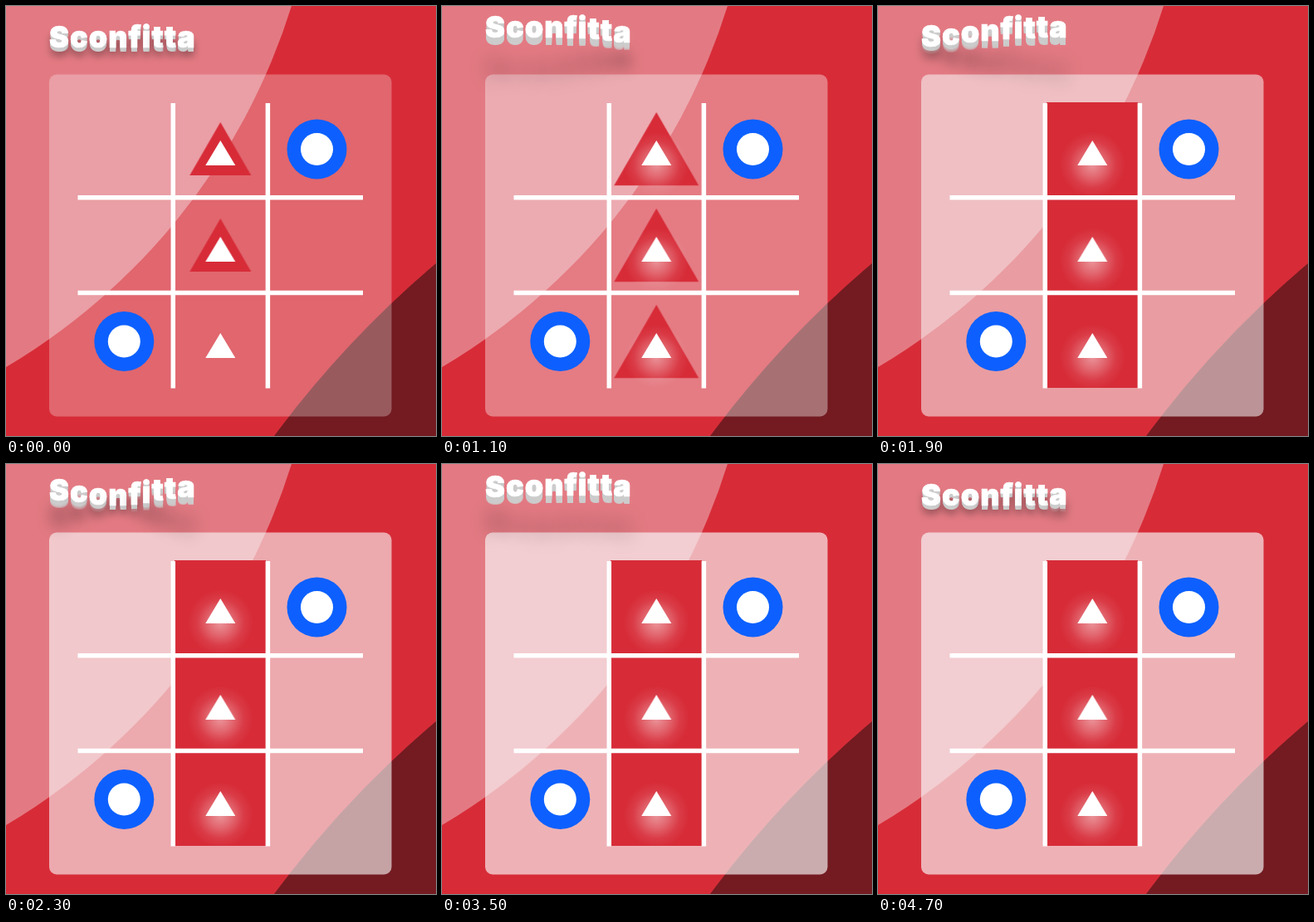
Recreate the animation shown at these times as an HTML page. Size 518 px wide and 518 px high, loop 4.8 s.

```html
<!DOCTYPE html>
<html lang="it">
<head>
<meta charset="utf-8">
<title>Sconfitta</title>
<style>
  html, body { margin: 0; width: 100%; height: 100%; overflow: hidden; background: #d72c38; }
  svg { position: absolute; left: 0; top: 0; width: 518px; height: 518px; }

  h1 {
    position: absolute; left: 52px; top: 19px; margin: 0;
    font: 900 36px/1 Inter, "DejaVu Sans", sans-serif;
    letter-spacing: 1px; white-space: nowrap; color: #fff;
    -webkit-text-stroke: .7px #fff;
  }
  h1 span {
    position: relative; display: inline-block; top: 0;
    animation: bounce 4.8s calc(var(--i) * .1s) infinite both;
  }
  /* Two bounces of 2 s each, then a rest; the way down mirrors the ease of the way up. */
  @keyframes bounce {
    0%, 41.6667%, 83.3333%, 100% {
      top: 0;
      animation-timing-function: ease;
      text-shadow: 0 1px 0 #ccc, 0 2px 0 #ccc, 0 3px 0 #ccc, 0 4px 0 #ccc, 0 5px 0 #ccc,
        0 6px 0 transparent, 0 7px 0 transparent, 0 8px 0 transparent, 0 9px 0 transparent,
        0 10px 10px rgba(0, 0, 0, .4);
    }
    20.8333%, 62.5% {
      top: -12px;
      animation-timing-function: cubic-bezier(.75, 0, .75, .9);
      text-shadow: 0 1px 0 #ccc, 0 2px 0 #ccc, 0 3px 0 #ccc, 0 4px 0 #ccc, 0 5px 0 #ccc,
        0 6px 0 #ccc, 0 7px 0 #ccc, 0 8px 0 #ccc, 0 9px 0 #ccc,
        0 50px 25px rgba(0, 0, 0, .2);
    }
  }

  .panel { fill: #fafafa; animation: brighten 4.8s infinite; }
  @keyframes brighten {
    0% { fill-opacity: .28; animation-timing-function: ease-in-out; }
    62.5%, 100% { fill-opacity: .65; }
  }

  .tri { fill: #d72c38; }
  .grow { animation: grow 4.8s infinite; }
  @keyframes grow {
    0%, 16.6667% { transform: scale(1); animation-timing-function: ease-in-out; }
    47.9167%, 100% { transform: scale(5.6); }
  }
  .pop { animation: pop 4.8s infinite; }
  @keyframes pop {
    0% { transform: scale(0); animation-timing-function: ease; }
    12.5%, 100% { transform: scale(1); }
  }
  .glow { fill: url(#light); animation: glow 4.8s linear infinite; }
  @keyframes glow {
    0%, 12.5% { opacity: 0; }
    23%, 100% { opacity: 1; }
  }
</style>
</head>
<body>
<svg viewBox="0 0 518 518">
  <defs>
    <radialGradient id="light">
      <stop offset="0" stop-color="#fff" stop-opacity=".5"/>
      <stop offset=".35" stop-color="#fff" stop-opacity=".3"/>
      <stop offset=".7" stop-color="#fff" stop-opacity=".08"/>
      <stop offset="1" stop-color="#fff" stop-opacity="0"/>
    </radialGradient>
    <clipPath id="cell"><rect x="-54.5" y="-55.5" width="109" height="111.5"/></clipPath>
    <g id="ring">
      <circle r="36" fill="#0d60ff"/>
      <circle r="19.5" fill="#fff"/>
    </g>
    <path id="core" d="M0-10 18 20H-18Z" fill="#fff"/>
  </defs>

  <rect width="518" height="518" fill="#d72c38"/>
  <circle cx="-394" cy="-230" r="773" fill="#e37a83"/>
  <path d="M518 310A1250 1250 0 0 0 323 518H518Z" fill="#731b21"/>
  <rect class="panel" x="52" y="82.5" width="412.5" height="412" rx="9"/>

  <g transform="translate(258.3 172)" clip-path="url(#cell)">
    <g class="grow"><path class="tri" d="M0-32 37 32H-37Z"/></g>
    <circle class="glow" cy="19" r="40"/>
    <use href="#core"/>
  </g>
  <g transform="translate(258.3 288)" clip-path="url(#cell)">
    <g class="grow"><path class="tri" d="M0-32 37 32H-37Z"/></g>
    <circle class="glow" cy="19" r="40"/>
    <use href="#core"/>
  </g>
  <g transform="translate(258.3 404)" clip-path="url(#cell)">
    <g class="grow"><path class="tri pop" d="M0-32 37 32H-37Z"/></g>
    <circle class="glow" cy="19" r="40"/>
    <use href="#core"/>
  </g>

  <use href="#ring" x="374.5" y="172.5"/>
  <use href="#ring" x="142.3" y="404"/>

  <path d="M201.3 117V460.5M315.4 117V460.5M86.5 230.8H430M86.5 345.6H430" stroke="#fff" stroke-width="5.5"/>
</svg>
<h1><span style="--i:0">S</span><span style="--i:1">c</span><span style="--i:2">o</span><span style="--i:3">n</span><span style="--i:4">f</span><span style="--i:5">i</span><span style="--i:6">t</span><span style="--i:7">t</span><span style="--i:8">a</span></h1>
</body>
</html>
```
